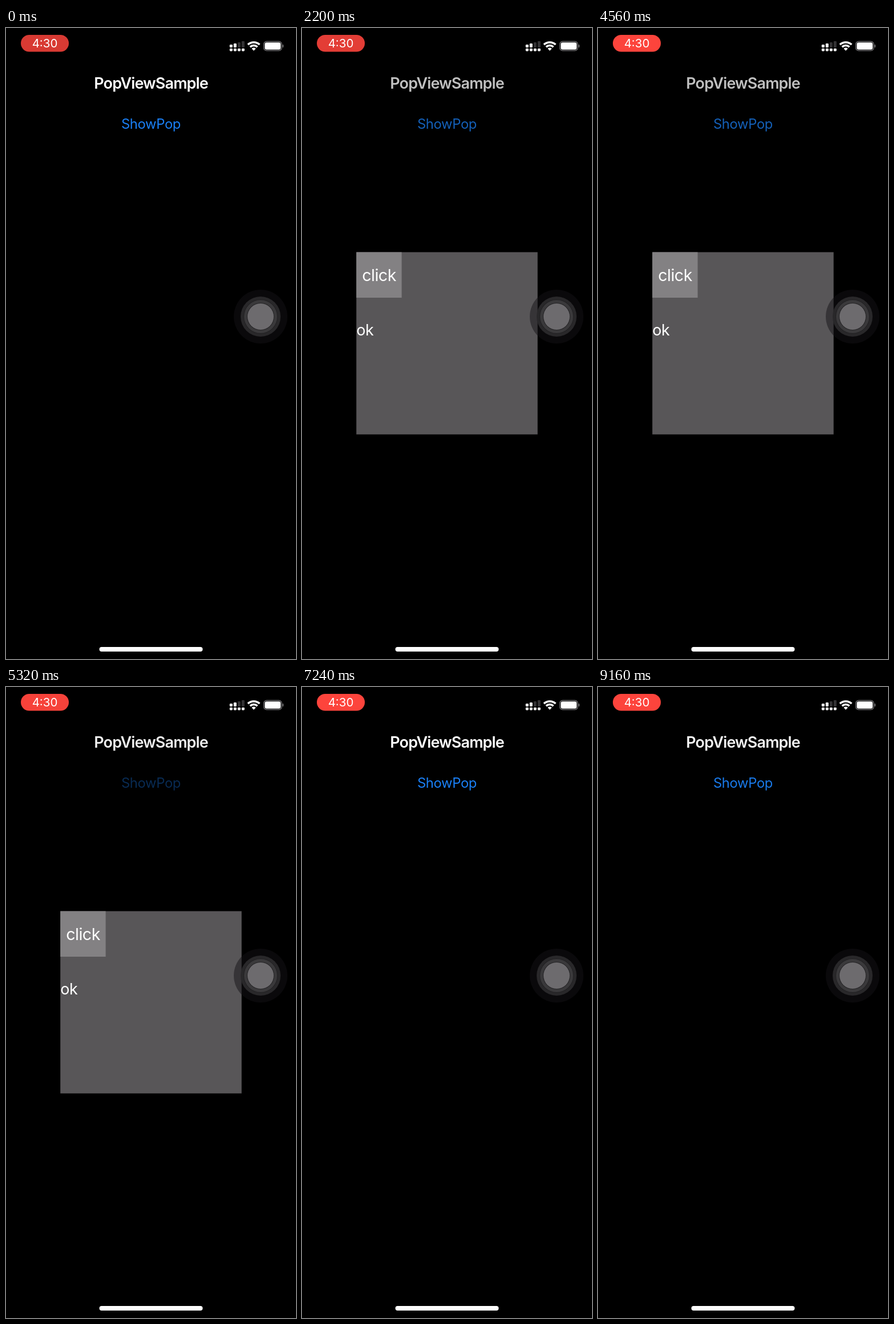
Recreate the animation shown at these times as an HTML page with a canvas. Size 508 px wide and 1102 px high, loop 9200 ms.

```html
<!DOCTYPE html>
<html lang="en">
<head>
<meta charset="utf-8">
<title>PopViewSample</title>
<style>
  html, body { margin: 0; width: 100%; height: 100%; overflow: hidden; background: #000; }
  canvas { display: block; width: 508px; height: 1102px; }
</style>
</head>
<body>
<canvas id="stage" width="508" height="1102"></canvas>
<script>
const ctx = document.getElementById('stage').getContext('2d');
const LOOP = 9200;
// [open, close] times of the popup
const SHOWS = [[1600, 4980], [5240, 6640], [7520, 8120], [8480, 8980]];
const PRESS = 110, RELEASE = 400, DIM = 250;

const clamp = v => Math.max(0, Math.min(1, v));
const smooth = v => { v = clamp(v); return v * v * (3 - 2 * v); };

function rect(x, y, w, h, r, fill) {
  ctx.fillStyle = fill;
  ctx.beginPath();
  ctx.roundRect(x, y, w, h, r);
  ctx.fill();
}

function disc(x, y, r, fill) {
  ctx.fillStyle = fill;
  ctx.beginPath();
  ctx.arc(x, y, r, 0, Math.PI * 2);
  ctx.fill();
}

function text(str, x, y, size, { weight = 400, spacing = 0, align = 'center', color = '#fff' } = {}) {
  ctx.font = `${weight} ${size}px Inter, Roboto, sans-serif`;
  ctx.letterSpacing = spacing + 'px';
  ctx.textAlign = align;
  ctx.fillStyle = color;
  ctx.fillText(str, x, y);
}

function popupState(t) {
  let open = false, dim = 0, link = 1;
  for (const [start, end] of SHOWS) {
    if (t >= start && t < end) {
      open = true;
      dim = smooth((t - start) / DIM);
    } else if (t >= end && t < end + DIM) {
      dim = 1 - smooth((t - end) / DIM);
    }
    if (t >= start - PRESS && t < start) link = 0.2;
    else if (t >= start && t < start + RELEASE) link = 0.2 + 0.8 * (t - start) / RELEASE;
  }
  return { open, dim: dim * 0.25, link };
}

function drawClock(t) {
  const phase = (t - 4900) / 2120;
  const dist = Math.abs(phase - Math.round(phase));
  const k = 1 - 0.2 * smooth((dist - 0.14) / 0.26);
  rect(26, 12, 84, 29.5, 14.75, `rgb(${253 * k}, ${68 * k}, ${60 * k})`);
  text('4:30', 68, 34.3, 20.5);
}

function drawSignal() {
  for (let i = 0; i < 4; i++) {
    const x = 391.8 + i * 7;
    const h = 5 + i * 2;
    rect(x, 34 - h, 5, h, 1.3, i < 2 ? '#fff' : '#333234');
    rect(x, 35.8, 5, 4.6, 1.3, '#fff');
  }
}

function drawWifi() {
  const x = 434, y = 39.8, half = 0.76, mid = -Math.PI / 2;
  ctx.strokeStyle = ctx.fillStyle = '#fff';
  ctx.lineWidth = 3.5;
  for (const r of [9.2, 14.9]) {
    ctx.beginPath();
    ctx.arc(x, y, r, mid - half, mid + half);
    ctx.stroke();
  }
  ctx.beginPath();
  ctx.moveTo(x, y);
  ctx.arc(x, y, 5.3, mid - half, mid + half);
  ctx.fill();
}

function drawBattery() {
  ctx.strokeStyle = '#706f71';
  ctx.lineWidth = 1.4;
  ctx.beginPath();
  ctx.roundRect(451.5, 23.5, 31.5, 16, 5);
  ctx.stroke();
  rect(453.3, 25.3, 27.9, 12.4, 3.2, '#fff');
  rect(484.4, 29, 1.8, 5, 0.9, '#706f71');
}

function drawPopup() {
  rect(95.2, 391.5, 317.5, 318.2, 0, '#585658');
  rect(95.2, 391.5, 79.4, 79.4, 0, '#838183');
  text('click', 135, 442, 28.6, { spacing: -0.5 });
  text('ok', 95.3, 537.3, 27, { spacing: -0.6, align: 'left' });
}

function drawTouchButton() {
  const x = 446, y = 504;
  disc(x, y, 47, 'rgba(20, 18, 22, 0.5)');
  disc(x, y, 35, '#29282a');
  disc(x, y, 30, '#222123');
  disc(x, y, 29, '#3a393b');
  disc(x, y, 24, '#252426');
  disc(x, y, 23, '#6d6b6e');
}

function draw(t) {
  const { open, dim, link } = popupState(t);
  ctx.fillStyle = '#000';
  ctx.fillRect(0, 0, 508, 1102);

  text('PopViewSample', 254, 106.3, 27, { weight: 600, spacing: -0.9 });
  ctx.globalAlpha = link;
  text('ShowPop', 254, 175.7, 23.8, { spacing: -0.35, color: '#1a80f7' });
  ctx.globalAlpha = 1;

  ctx.fillStyle = `rgba(0, 0, 0, ${dim})`;
  ctx.fillRect(0, 0, 508, 1102);
  if (open) drawPopup();

  drawClock(t);
  drawSignal();
  drawWifi();
  drawBattery();
  drawTouchButton();
  rect(163.5, 1081, 181, 8, 4, '#fff');
}

const began = performance.now();
function tick() {
  draw((performance.now() - began) % LOOP);
  requestAnimationFrame(tick);
}
tick();
</script>
</body>
</html>
```
